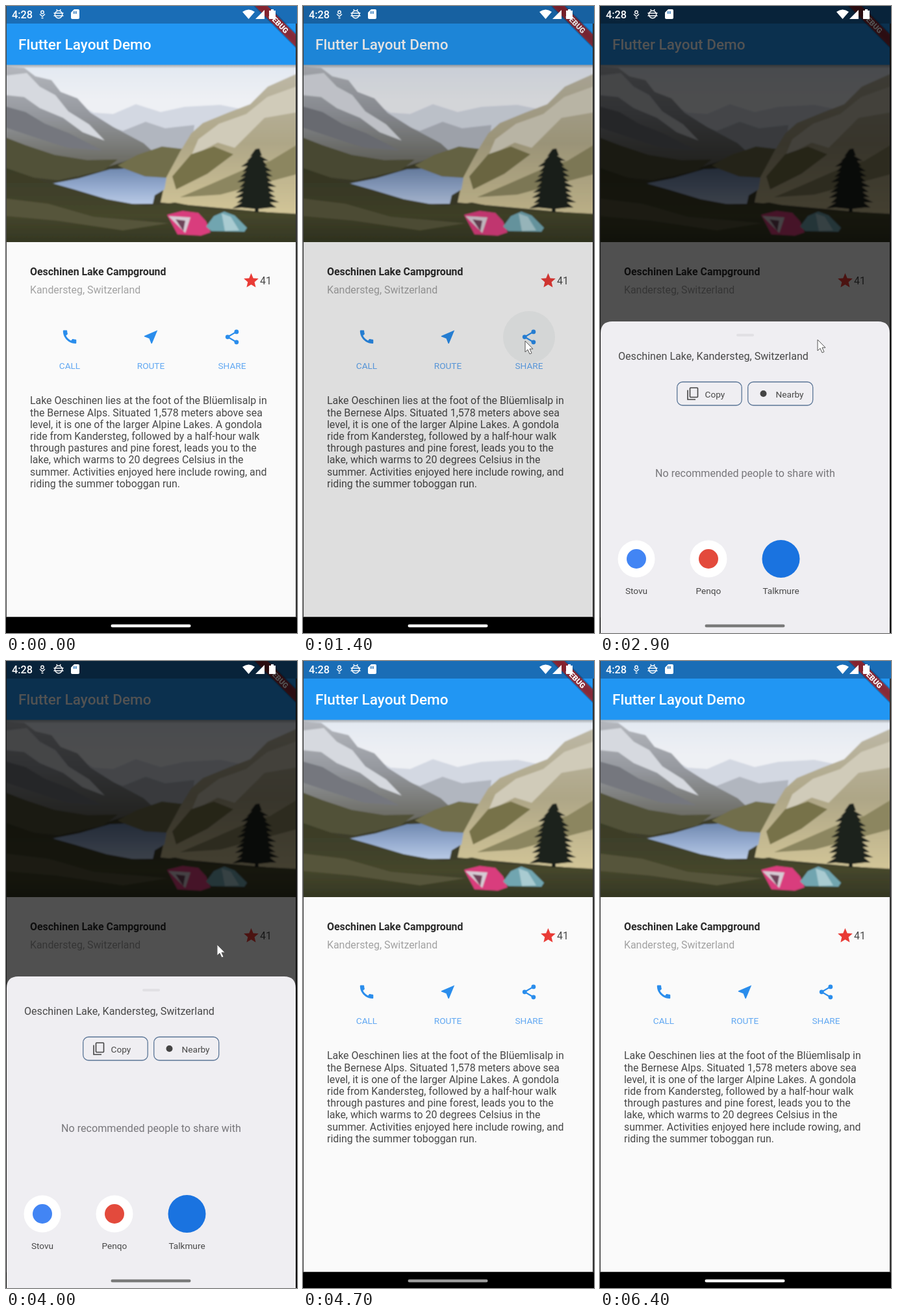
Recreate the animation shown at these times as an HTML page. Size 448 by 964 pixels, loop 6.5 s.

```html
<!DOCTYPE html>
<html lang="en">
<head>
<meta charset="utf-8">
<title>Layout demo with share sheet</title>
<style>
  html, body { margin: 0; width: 100%; height: 100%; overflow: hidden; background: #000; }
  svg { display: block; width: 100vw; height: 100vh; }
  text { font: 15.9px Roboto, sans-serif; fill: #484848; }
  .mid { text-anchor: middle; }
  .small { font-size: 13.65px; }
  .label { font-size: 13.65px; fill: #62a8f2; text-anchor: middle; }
  .sheet { font-size: 16.1px; }
  .icon { fill: #2a8dec; stroke: none; }
</style>
</head>
<body>
<svg viewBox="0 0 448 964">
  <defs>
    <linearGradient id="sky" x2="0" y2="1">
      <stop stop-color="#e0e7f1"/><stop offset=".4" stop-color="#eef0f4"/>
    </linearGradient>
    <linearGradient id="leftRock" x2="0" y2="1">
      <stop stop-color="#b4b7bd"/><stop offset=".45" stop-color="#94979d"/><stop offset="1" stop-color="#5f5e52"/>
    </linearGradient>
    <linearGradient id="rightRock" x2="0" y2="1">
      <stop stop-color="#bdb8a6"/><stop offset=".5" stop-color="#aea687"/><stop offset="1" stop-color="#d3c698"/>
    </linearGradient>
    <linearGradient id="lake" x2="0" y2="1">
      <stop stop-color="#7089b0"/><stop offset=".5" stop-color="#94aace"/><stop offset="1" stop-color="#b9cae6"/>
    </linearGradient>
    <linearGradient id="grass" x2="0" y2="1">
      <stop stop-color="#3a3b27"/><stop offset=".6" stop-color="#45462c"/><stop offset="1" stop-color="#303320"/>
    </linearGradient>
    <linearGradient id="shade" x2="0" y2="1">
      <stop stop-opacity=".3"/><stop offset="1" stop-opacity="0"/>
    </linearGradient>
    <clipPath id="photoBox"><path d="M0 91H446V363H0z"/></clipPath>
    <filter id="soft"><feGaussianBlur stdDeviation="2.5"/></filter>
    <filter id="lens"><feGaussianBlur stdDeviation="1"/></filter>
  </defs>

  <path fill="#fafafa" d="M0 0H448V964H0z"/>

  <g clip-path="url(#photoBox)">
   <g filter="url(#lens)">
    <path fill="url(#sky)" d="M-9 80H457V240H-9z"/>
    <path fill="#3d3e29" d="M-9 225H457V373H-9z"/>
    <path fill="#d3d8e2" d="M110 150L135 164 165 166 200 151 238 163 275 155 330 152 360 158 300 230 160 225z"/>
    <path fill="#b1b6bf" d="M150 182L180 192 215 178 245 188 290 183 285 222 200 235z"/>
    <path fill="url(#leftRock)" d="M-9 93L28 95 45 108 70 114 84 132 110 142 130 164 165 186 212 211 224 222 180 240 110 262 -9 262z"/>
    <path fill="#d6d9df" d="M-9 108L32 103 52 124 76 137 96 162 128 182 152 207 118 194 88 172 52 157 28 140 -9 136z"/>
    <path fill="#74777e" d="M-9 152L30 163 60 181 98 196 148 222 95 218 48 203 -9 184z"/>
    <path fill="#515138" d="M-9 199L30 214 75 229 125 237 172 236 150 253 80 268 -9 258z"/>
    <path fill="#716e4b" d="M172 245L202 229 240 216 274 220 262 248 246 266 212 262 190 254z"/>
    <path fill="url(#rightRock)" d="M457 100L403 124 376 151 342 164 303 180 285 196 268 224 246 265 238 302 457 322z"/>
    <path fill="#d0cbb9" d="M457 120L402 140 370 166 328 181 296 205 285 231 326 210 352 218 398 172 457 162z"/>
    <path fill="#8c8660" d="M457 208L407 238 372 249 315 274 268 294 330 290 457 256z"/>
    <path fill="#77724a" d="M285 228L320 216 350 228 310 258 262 282 256 262z"/>
    <path fill="url(#lake)" d="M66 274L112 265 160 251 182 250 214 262 247 264 244 282 229 291 226 304 150 305 115 288z"/>
    <path fill="url(#grass)" d="M-9 246L55 268 105 282 155 297 215 308 260 302 310 312 457 320V373H-9z"/>
    <path fill="#56553a" d="M-9 295L65 304 135 324 250 334 180 345 78 330 -9 322z"/>
    <path id="tree" fill="#1e211a"/>
    <path fill="#d93c7d" d="M248 321L272 315 296 318 308 331 315 348 300 353 264 351z"/>
    <path fill="#d7cbd4" d="M250 323L284 325 276 349z"/>
    <path fill="#6d4358" d="M261 328L276 330 273 346z"/>
    <path fill="#71a5b0" d="M308 339L320 323 336 316 352 322 371 341 367 347 316 346z"/>
    <path fill="#a9cbd1" d="M332 319L346 324 359 345 337 346z"/>
   </g>
  </g>

  <path fill="url(#shade)" d="M0 90H448V96H0z"/>
  <path fill="#2196f3" d="M0 0H448V90.5H0z"/>
  <path fill="#1a6db6" d="M0 0H448V27H0z"/>
  <text x="19" y="67.3" style="font-size:22.6px;font-weight:500;fill:#fff">Flutter Layout Demo</text>

  <g transform="translate(447 -.5) rotate(45)">
    <path filter="url(#soft)" opacity=".5" d="M-48 31.8H48V45.4H-48z"/>
    <path fill="#b71c1c" fill-opacity=".7" d="M-48 31.8H48V45.4H-48z"/>
    <text class="mid" y="42.7" style="font-size:11.6px;font-weight:900;fill:#fff">DEBUG</text>
  </g>

  <text x="37" y="414.2" style="font-weight:700;fill:#2a2a2a">Oeschinen Lake Campground</text>
  <text x="37" y="441.7" style="fill:#a2a2a2">Kandersteg, Switzerland</text>
  <path transform="translate(363.8 408.6) scale(1.136)" fill="#e93b36" d="M12 17.27L18.18 21l-1.64-7.03L22 9.24l-7.19-.61L12 2 9.19 8.63 2 9.24l5.46 4.73L5.82 21z"/>
  <text x="391" y="428">41</text>

  <circle id="ripple" cx="348" cy="509" r="40" fill="#4f6060"/>
  <g class="icon">
    <path transform="translate(84.4 495.2) scale(1.136)" d="M20 15.4c-1.2 0-2.4-.2-3.5-.6-.4-.1-.7 0-1 .3l-1.6 1.9c-2.8-1.3-5.5-3.9-6.9-6.8l2-1.7c.2-.2.3-.6.2-1-.4-1.1-.6-2.3-.6-3.5 0-.5-.4-1-1-1H4.2C3.7 3 3 3.2 3 4c0 9.3 7.7 17 17 17 .7 0 1-.6 1-1.2v-3.4c0-.5-.4-1-1-1z"/>
    <path transform="translate(209.4 495.2) scale(1.136)" d="M21 3L3 10.5v1l6.8 2.7L12.5 21h1z"/>
    <g transform="translate(334.4 495.2) scale(1.136)">
      <path d="M18 5L6 12 18 19" fill="none" stroke="#2a8dec" stroke-width="2"/>
      <circle cx="18" cy="5" r="3"/><circle cx="6" cy="12" r="3"/><circle cx="18" cy="19" r="3"/>
    </g>
  </g>
  <text class="label" x="98" y="557.5">CALL</text>
  <text class="label" x="223" y="557.5">ROUTE</text>
  <text class="label" x="348" y="557.5">SHARE</text>
  <g id="story"></g>

  <path d="M0 939.3H448V964H0z"/>
  <path fill="#444" d="M0 0H1V940H0z"/>
  <path fill="#333" d="M446 27H448V940H446z"/>
  <path id="dim" d="M0 0H448V964H0z"/>

  <g fill="#fff">
    <text x="9" y="19" style="font-size:16.3px;font-weight:500;fill:#fff">4:28</text>
    <g fill="none" stroke="#fff" stroke-width="1.4">
      <circle cx="56" cy="9.5" r="2.2"/>
      <path d="M52 12.5L56 16 60 12.5M54.5 18.5H57.5"/>
      <circle cx="81" cy="13" r="5.7"/>
      <path d="M73.500 11H88.500M73.500 15H88.500M78 5L79 8M84 5L83 8"/>
    </g>
    <path d="M105 5H111Q113 5 113 7V18Q113 20 111 20H102Q100 20 100 18V10z"/>
    <path fill="#1a6db6" d="M104 8h1.500v4h-1.500zM107 8h1.500v4h-1.500z"/>
    <path d="M364 9Q373.500 2 383 9L373.500 20z"/>
    <path d="M384 20L398 6V20z"/>
    <path d="M405 7H408V5H412V7H415V20H405z"/>
  </g>

  <g id="sheet">
    <path fill="#efeef2" d="M1 500V18Q1 0 19 0H428Q446 0 446 18V500z"/>
    <rect x="210" y="19" width="27" height="4" rx="2" fill="#e1e0e4"/>
    <text class="sheet" x="28" y="58.5">Oeschinen Lake, Kandersteg, Switzerland</text>
    <g fill="none" stroke="#5b7697" stroke-width="1.3">
      <rect x="118.7" y="93" width="99.5" height="36" rx="8.5"/>
      <rect x="227.7" y="93" width="100" height="36" rx="8.5"/>
    </g>
    <g fill="none" stroke="#444" stroke-width="1.6">
      <rect x="138.5" y="102" width="12" height="14.5" rx="1"/>
      <path d="M135 105.5V120H147"/>
    </g>
    <circle cx="251.5" cy="111" r="5" fill="#444"/>
    <text class="small" x="161.5" y="116.5">Copy</text>
    <text class="small" x="270.5" y="116.5">Nearby</text>
    <g id="targets">
      <text class="sheet mid" x="223.5" y="238.5" style="fill:#77767a">No recommended people to share with</text>
      <circle cx="56" cy="365" r="28.5" fill="#fff"/>
      <circle cx="56" cy="365" r="15" fill="#4285f4"/>
      <circle cx="167" cy="365" r="28.5" fill="#fff"/>
      <circle cx="167" cy="365" r="15" fill="#e34a3c"/>
      <circle cx="278.5" cy="365" r="29" fill="#1a73e0"/>
      <text class="small mid" x="56" y="419">Stovu</text>
      <text class="small mid" x="167" y="419">Penqo</text>
      <text class="small mid" x="278.5" y="419">Talkmure</text>
    </g>
  </g>

  <rect id="pill" x="161.5" y="950.7" width="123" height="4.6" rx="2.3"/>
  <path id="cursor" fill="#fff" stroke="#555" stroke-linejoin="round"
        d="M0 0V17L4 13.3 7 20 10 18.7 7 12.2H12z"/>
</svg>

<script>
const LOOP = 6500;
const el = id => document.getElementById(id);

// Each track is a list of [time, value...]; values are eased between neighbours.
const linear = u => u;
const smooth = u => u * u * (3 - 2 * u);
function track(keys, t, ease = smooth) {
  if (t <= keys[0][0]) return keys[0].slice(1);
  for (let i = 1; i < keys.length; i++) {
    const [a, b] = [keys[i - 1], keys[i]];
    if (t < b[0]) {
      const u = ease((t - a[0]) / (b[0] - a[0]));
      return a.slice(1).map((v, k) => v + (b[k + 1] - v) * u);
    }
  }
  return keys[keys.length - 1].slice(1);
}

const DIM = [[1330, 0], [1750, .68], [4080, .68], [4550, 0]];
const RIPPLE = [[1200, 0], [1380, .06], [1500, .06], [1750, 0]];
const SHEET_TOP = [[1450, 970], [1750, 784], [1840, 784], [2100, 485], [4030, 485], [4200, 970]];
const TARGETS = [[2120, 0], [2320, 1]];
const PILL = [[2000, 255], [2300, 122], [4100, 122], [4400, 155], [5000, 155], [5200, 255]];
const CURSOR = [[600, 460, 620], [1150, 342, 515], [2600, 342, 515], [2880, 335, 513],
                [3400, 335, 513], [3850, 325, 436], [4150, 325, 436], [4550, 460, 410]];

function buildTree() {
  let left = "", right = "";
  for (let i = 0; i < 11; i++) {
    const y = 222 + i * 8, reach = 9 + 25 * Math.sqrt(i / 10);
    const sway = 3 * Math.sin(i * 2.3);
    right += `L${385 + reach + sway} ${y + 8}L${385 + reach * .65} ${y + 8}`;
    left = `L${385 - reach * .65} ${y + 8}L${385 - reach + sway} ${y + 9}` + left;
  }
  el("tree").setAttribute("d", `M390 219${right}L389 312V317H383V312${left}L384 220z`);
}

function buildStory() {
  const lines = [
    "Lake Oeschinen lies at the foot of the Blüemlisalp in",
    "the Bernese Alps. Situated 1,578 meters above sea",
    "level, it is one of the larger Alpine Lakes. A gondola",
    "ride from Kandersteg, followed by a half-hour walk",
    "through pastures and pine forest, leads you to the",
    "lake, which warms to 20 degrees Celsius in the",
    "summer. Activities enjoyed here include rowing, and",
    "riding the summer toboggan run."
  ];
  el("story").innerHTML = lines.map((line, i) =>
    `<text x="37" y="${612.3 + i * 18.2}">${line}</text>`).join("");
}

function draw(now) {
  const t = now % LOOP;
  const [top] = track(SHEET_TOP, t);
  const [x, y] = track(CURSOR, t);
  const [grey] = track(PILL, t, linear);
  el("dim").setAttribute("opacity", track(DIM, t, linear)[0]);
  el("ripple").setAttribute("opacity", track(RIPPLE, t)[0]);
  el("sheet").setAttribute("transform", `translate(0 ${top})`);
  el("targets").setAttribute("opacity", track(TARGETS, t)[0]);
  el("pill").setAttribute("fill", `rgb(${grey},${grey},${grey})`);
  el("cursor").setAttribute("transform", `translate(${x} ${y})`);
}

buildTree();
buildStory();
const start = performance.now();
function tick() {
  draw(performance.now() - start);
  requestAnimationFrame(tick);
}
tick();
</script>
</body>
</html>
```
